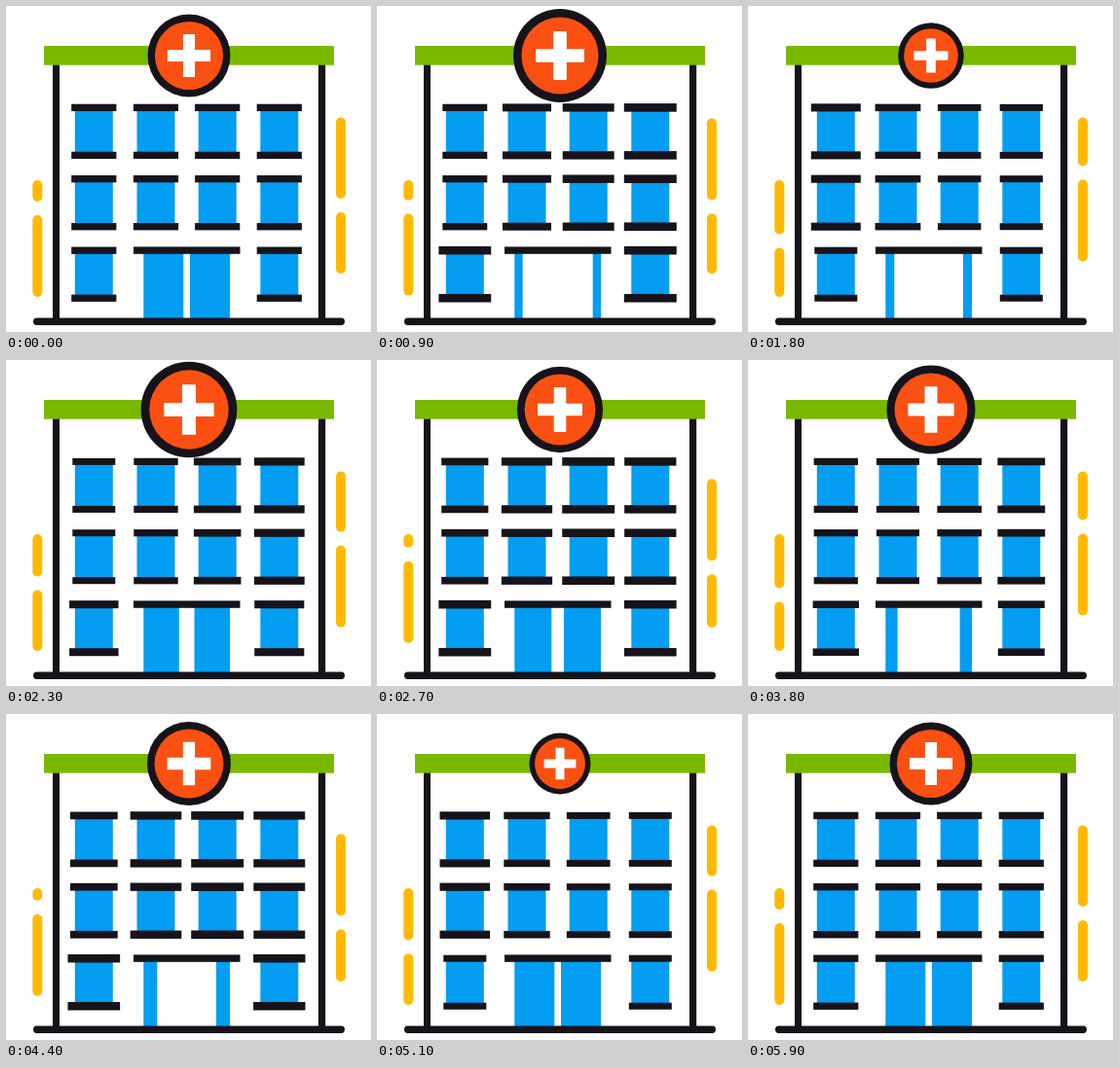
Animation, 375 px wide and 335 px high, one loop 6 s. Source, as an HTML page:

```html
<!DOCTYPE html>
<html>
<head>
<meta charset="utf-8">
<title>Hospital</title>
<style>
  html, body { margin: 0; width: 100%; height: 100%; overflow: hidden; background: #fff; }
  svg { display: block; width: 375px; height: 335px; }
</style>
</head>
<body>
<svg id="stage" viewBox="0 0 375 335"></svg>
<script>
const LOOP = 6000, STEP = 100, HALF = 834, SETTLE = 5800;
const INK = '#17131a', BLUE = '#039df2', GREEN = '#7ab800', RED = '#fa5012', GOLD = '#ffba00';
const stage = document.getElementById('stage');

function add(tag, attrs, parent = stage) {
  const el = document.createElementNS('http://www.w3.org/2000/svg', tag);
  set(el, attrs);
  parent.appendChild(el);
  return el;
}
function set(el, attrs) {
  for (const k in attrs) el.setAttribute(k, attrs[k]);
}
const rect = (x, y, width, height, fill, rx = 0) => add('rect', { x, y, width, height, fill, rx });

// Cosine-eased value from a list of [time, value] keys.
function tween(keys, t) {
  let i = 1;
  while (i < keys.length && keys[i][0] < t) i++;
  if (i === keys.length) return keys[i - 1][1];
  const [t0, a] = keys[i - 1], [t1, b] = keys[i];
  return a + (b - a) * (1 - Math.cos(Math.PI * (t - t0) / (t1 - t0))) / 2;
}

// Swing between lo and hi, leaving from and returning to the rest value.
function swing(peak, lo, hi, rest) {
  const keys = [[0, rest]];
  for (let k = -2; k < 8; k++) {
    const t = peak + k * HALF;
    if (t > 0 && t < 5700) keys.push([t, k % 2 ? lo : hi]);
  }
  keys.push([SETTLE, rest]);
  return keys;
}

// Building
rect(48, 58, 7, 264, INK);
rect(321, 58, 7.2, 264, INK);
rect(39, 41, 298, 19.7, GREEN);

// Windows: [centre x, top cap y, peak time]
const columns = [[90.3, 1493], [154, 1261], [217.2, 1075], [280.8, 890]];
const windows = [
  ...[104.4, 177.7].flatMap(y => columns.map(([x, peak]) => [x, y, peak])),
  [90.3, 251.2, 970], [280.8, 251.2, 935]
].map(([x, y, peak]) => {
  rect(x - 19.5, y, 39, 49, BLUE);
  return { x, y, keys: swing(peak, 22, 27, 23.1), caps: [0, 1].map(() => rect(0, 0, 0, 0, INK)) };
});

// Doors
const doors = [0, 1].map(() => rect(0, 254, 0, 68, BLUE));
const doorKeys = [[0, 41], [1000, 7.5], [1700, 7.5], [2400, 38], [3000, 38], [4100, 7], [5100, 41]];
rect(131, 247.4, 109.5, 7.4, INK);
rect(28, 320.6, 320, 7.3, INK, 3.6);

// Side bars
const bars = [0, 1, 2, 3].map(() => rect(0, 0, 10, 0, GOLD, 5));
const barKeys = swing(1966, 205, 253, 215);

// Sign, drawn at an outer radius of 100
const sign = add('g', {});
add('circle', { r: 100, fill: INK }, sign);
add('circle', { r: 82.5, fill: RED }, sign);
add('path', { d: 'M-52 0H52M0-52V52', stroke: '#fff', 'stroke-width': 28.5 }, sign);
const signKeys = swing(728, 30, 50, 42.5);

function placePair(i, x, top, bottom, edge) {
  const end = edge - 14;
  const first = Math.max(top, edge - 98);
  set(bars[i], { x, y: first, height: Math.max(0, end - first) });
  set(bars[i + 1], { x, y: edge, height: Math.min(bottom, edge + 84) - edge });
}

function draw(t) {
  for (const { x, y, keys, caps } of windows) {
    const half = tween(keys, t), h = half * 0.318;
    caps.forEach((cap, i) => set(cap, { x: x - half, y: y + 49 * i - h / 2, width: 2 * half, height: h }));
  }
  const w = tween(doorKeys, t);
  set(doors[0], { x: 141.3, width: w });
  set(doors[1], { x: 230 - w, width: w });
  const edge = tween(barKeys, t);
  placePair(0, 27.3, 179, 299, edge);
  placePair(2, 339, 114.5, 275, 427 - edge);
  set(sign, { transform: `translate(188 51) scale(${tween(signKeys, t) / 100})` });
}

const start = performance.now();
function tick() {
  const t = (performance.now() - start) % LOOP;
  draw(Math.floor(t / STEP) * STEP);
  requestAnimationFrame(tick);
}
tick();
</script>
</body>
</html>
```
